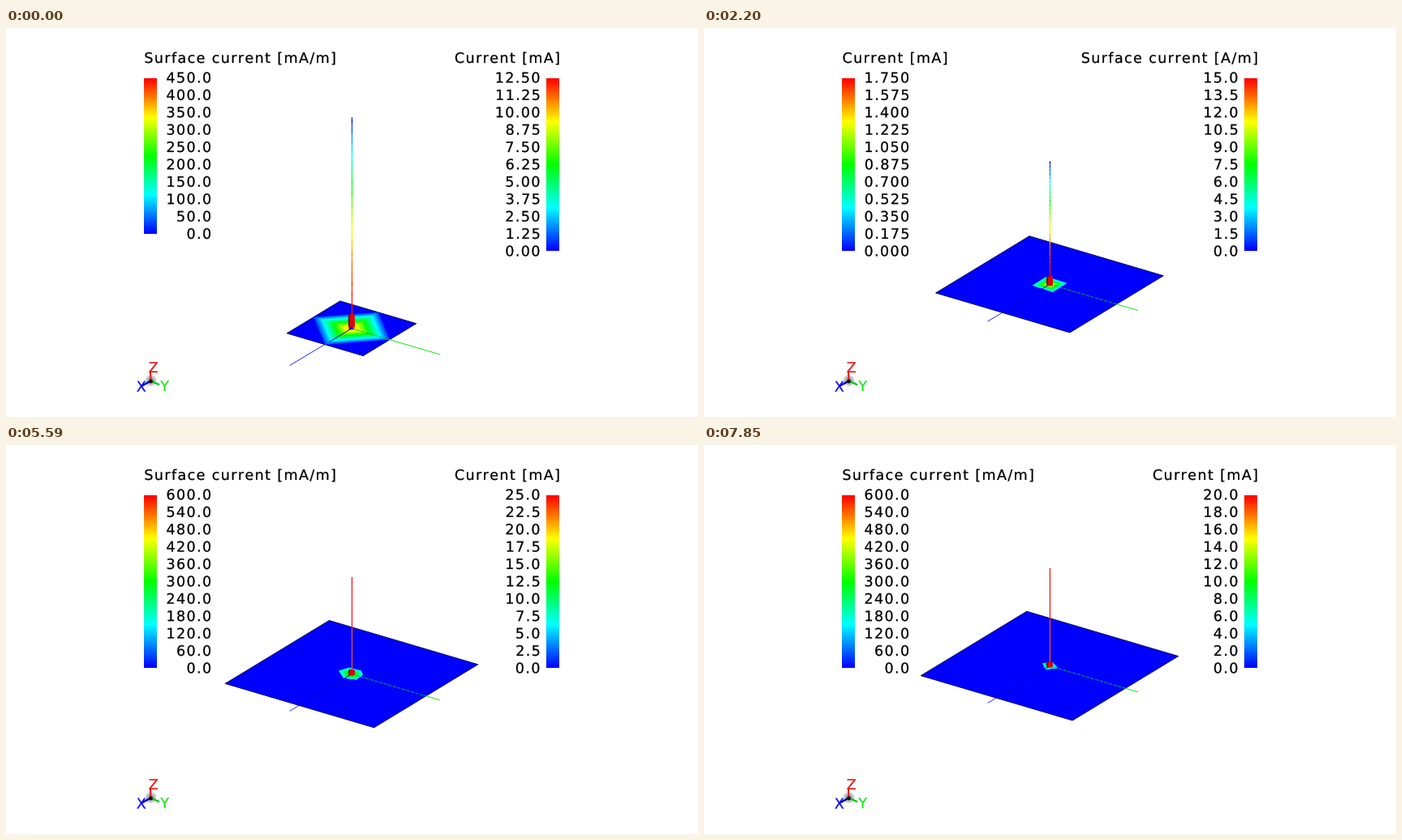
These frames come from a looping animation (853x480 px, 8 s). A matplotlib script:

```python
import colorsys
import numpy as np
import matplotlib.pyplot as plt
from matplotlib.animation import FuncAnimation
from matplotlib.collections import LineCollection, PolyCollection
from matplotlib.lines import Line2D
from matplotlib.patches import Circle, FancyBboxPatch, PathPatch, Polygon
from matplotlib.path import Path
from matplotlib.textpath import TextPath

W, H, DPI = 853, 480, 64
PX = 72 / DPI
STEP, LOOP = 25, 8000
CX = 426
FONT = {"family": "DejaVu Sans"}
SIZE, GAP = 17.5, 1.4
GREEN, RED = (0.1, 0.9, 0.1), (0.96, 0.1, 0.12)

fig = plt.figure(figsize=(W / DPI, H / DPI), dpi=DPI, facecolor="white")
ax = fig.add_axes([0, 0, 1, 1])
ax.set_xlim(0, W)
ax.set_ylim(H, 0)
ax.set_autoscale_on(False)
ax.axis("off")


def rainbow(v):
    v = min(max(v, 0), 1)
    return colorsys.hsv_to_rgb((1 - v) * 2 / 3, 1, 1)


BAR = np.array([[rainbow(v)] for v in np.linspace(1, 0, 214)])


# ---------- text with letter spacing ----------
glyphs = {}


def glyph(ch):
    if ch not in glyphs:
        end = TextPath((0, 0), "|", size=SIZE, prop=FONT).get_extents().x1
        both = TextPath((0, 0), ch + "|", size=SIZE, prop=FONT)
        shape = None if ch == " " else TextPath((0, 0), ch, size=SIZE, prop=FONT)
        glyphs[ch] = shape, both.get_extents().x1 - end
    return glyphs[ch]


def text_paths(s, x, base, right=False):
    parts, pos = [], 0
    for ch in s:
        shape, adv = glyph(ch)
        if shape is not None:
            parts.append((shape, pos))
        pos += adv + GAP
    lo = parts[0][0].get_extents().x0
    hi = parts[-1][0].get_extents().x1 + parts[-1][1]
    x -= hi if right else lo
    return [Path(p.vertices * [1, -1] + [x + dx, base], p.codes)
            for p, dx in parts]


# ---------- scene helpers ----------
class Layer:
    def __init__(self):
        self.items = []

    def add(self, artist):
        artist.set_zorder(len(self.items) + 1)
        self.items.append(artist)
        ax.add_artist(artist)

    def line(self, p, q, color, width=1.0, **kw):
        self.add(Line2D([p[0], q[0]], [p[1], q[1]], color=color,
                        lw=width * PX, **kw))

    def text(self, paths, color="black"):
        self.add(PathPatch(Path.make_compound_path(*paths), fc=color,
                           ec=color, lw=0.25 * PX))

    def show(self, on):
        for item in self.items:
            item.set_visible(on)


def legend(layer, x, n):
    bottom = 62 + 21.35 * n
    im = ax.imshow(BAR, extent=(x, x + 16, bottom, 63), aspect="auto",
                   interpolation="bilinear")
    layer.items.append(im)


def legend_text(title, top, n, digits, right):
    paths = text_paths(title, 681.5 if right else 171.5, 43, right)
    edge = 657.3 if right else 252
    for i in range(n + 1):
        label = f"{top * (n - i) / n:.{digits}f}"
        paths += text_paths(label, edge, 67.4 + 21.4 * i, True)
    return paths


def build(cy, k, top, graded, feed, left, right, patch, edge, peak):
    s = Layer()
    origin = np.array([CX, cy])
    u = k * np.array([1, 0.296])
    v = k * np.array([-0.699, 0.425])

    legend(s, 170, left[2])
    legend(s, 666, right[2])
    s.text(legend_text(*left, False) + legend_text(*right, True))

    # x axis hides under the plate, except over the bright patch
    s.line(origin, (350, cy + 45.5), (0.25, 0.25, 1))
    s.add(Polygon([origin - u - v, origin + u - v, origin + u + v,
                   origin - u + v], fc=(0, 0, 1), ec=(0, 0, 0.15), lw=0.7 * PX))

    shape = np.array(patch)
    scales = np.linspace(1, 0.03, 40)
    s.add(PolyCollection([origin + shape * f for f in scales],
                         facecolors=[rainbow(edge + (peak - edge) * (1 - f))
                                     for f in scales],
                         linewidths=0))

    s.line(origin, origin + 0.85 * v, (0, 0, 0.8), 0.9)
    tip = np.array([534.5, cy + 32])
    s.line(origin, origin + u, (0.05, 0.7, 0.2), 0.9, dashes=(5, 1.5))
    s.line(origin + u, tip, GREEN)

    # wire: quarter-wave current, or saturated red when it is long
    if graded:
        ys = np.linspace(top, cy, 121)
        s.add(LineCollection([[(CX, a), (CX, b + 0.3)] for a, b in zip(ys, ys[1:])],
                             colors=[rainbow(np.sin(np.pi / 2 * i / 120))
                                     for i in range(120)],
                             linewidths=1.4 * PX))
    else:
        s.line((CX, top), (CX, top + 65), RED, 1.3)
        s.line((CX, top + 65), (CX, cy), (0.93, 0.33, 0.18), 1.3)

    # feed point
    tall = feed > 12
    if tall:
        s.add(Polygon([(423, cy - 4), (428, cy - 4), (428, cy + 1.5),
                       (423, cy + 1.5)], fc=(0.05, 0.05, 0.75), lw=0))
    low = cy + (-1 if tall else 1.8)
    for x, w, color in ((422, 8, (0.3, 0, 0.02)), (423.4, 6.6, (0.87, 0, 0.06))):
        s.add(FancyBboxPatch((x, low - feed), w, feed, lw=0, fc=color,
                             boxstyle="round,pad=0,rounding_size=2.6"))
    s.show(False)
    return s


def triad():
    s = Layer()
    for r, g in ((7, 0.85), (5.5, 0.74), (3.5, 0.6)):
        s.add(Circle((178.5, 435), r, fc=(g, g, g), lw=0))
    c = (178.5, 435.5)
    s.line(c, (178, 424.5), (0.85, 0.1, 0.1), 2)
    s.line(c, (168.5, 441), (0, 0, 0.7), 2.4)
    s.line(c, (188, 439.8), (0, 0.8, 0.1), 2.4)
    s.add(Circle((178.5, 436), 2.4, fc=(0.08, 0.08, 0.1), lw=0))
    s.text(text_paths("Z", 176.5, 425), (0.9, 0.08, 0.08))
    s.text(text_paths("X", 161.3, 448.6), (0.05, 0.05, 0.95))
    s.text(text_paths("Y", 190.3, 448), GREEN)


def surface(top, n):
    return "Surface current [mA/m]", top, n, 1


def current(top, n, digits=1):
    return "Current [mA]", top, n, digits


def mirror(*pts):
    return list(pts) + [(-x, -y) for x, y in pts]


diamond = mirror((-47, -14), (33, -20))
octagon = mirror((-43, -13), (-9, -21), (30, -19), (48.5, -4))
square = mirror((-4, -9.5), (21.5, -1.5))
small = mirror((-3.5, -8.5), (19, -1.5))
pentagon = [(-23, -6), (4, -8), (16, 0), (5, 8), (-15, 4)]
shard = [(-16, -4), (-3, -8), (12, -4), (14, 1), (6, 7), (-10, 5)]
chip = [(-12, -2), (-6, -7), (8, -5), (11, -1), (7, 5), (-7, 4)]
tile = [(-9, -3.5), (4, -4.5), (10, 2.5), (-5, 4.5)]

strong = ("Surface current [A/m]", 15, 10, 1)
scenes = [
    build(370.7, 47, 110, True, 17, surface(450, 9), current(12.5, 10, 2),
          diamond, 0.06, 0.9),
    build(339.6, 71.7, 141, True, 14, surface(600, 10), current(36, 9),
          octagon, 0.08, 0.95),
    build(316.3, 82.7, 164, True, 12, current(1.75, 10, 3), strong,
          square, 0.2, 0.85),
    build(301.3, 87.2, 169, True, 10, current(1.75, 10, 3), strong,
          small, 0.2, 0.82),
    build(290, 90, 170, False, 8, surface(600, 10), current(30, 10),
          pentagon, 0.22, 0.8),
    build(282.6, 91.8, 162.5, False, 7.5, surface(600, 10), current(25, 10),
          shard, 0.22, 0.7),
    build(277, 93, 157, False, 7.5, surface(600, 10), current(22.5, 9),
          chip, 0.2, 0.62),
    build(272.6, 93.5, 152, False, 7, surface(600, 10), current(20, 10),
          tile, 0.2, 0.5),
]
triad()

starts = [0] + [(1070 + 1130 * i) // STEP for i in range(7)]


def update(i):
    now = sum(i >= s for s in starts) - 1
    for j, scene in enumerate(scenes):
        scene.show(j == now)
    return []


def reset():
    return update(0)


anim = FuncAnimation(fig, update, frames=LOOP // STEP, init_func=reset,
                     interval=STEP, repeat=True, repeat_delay=0, blit=False)
plt.show()
```
